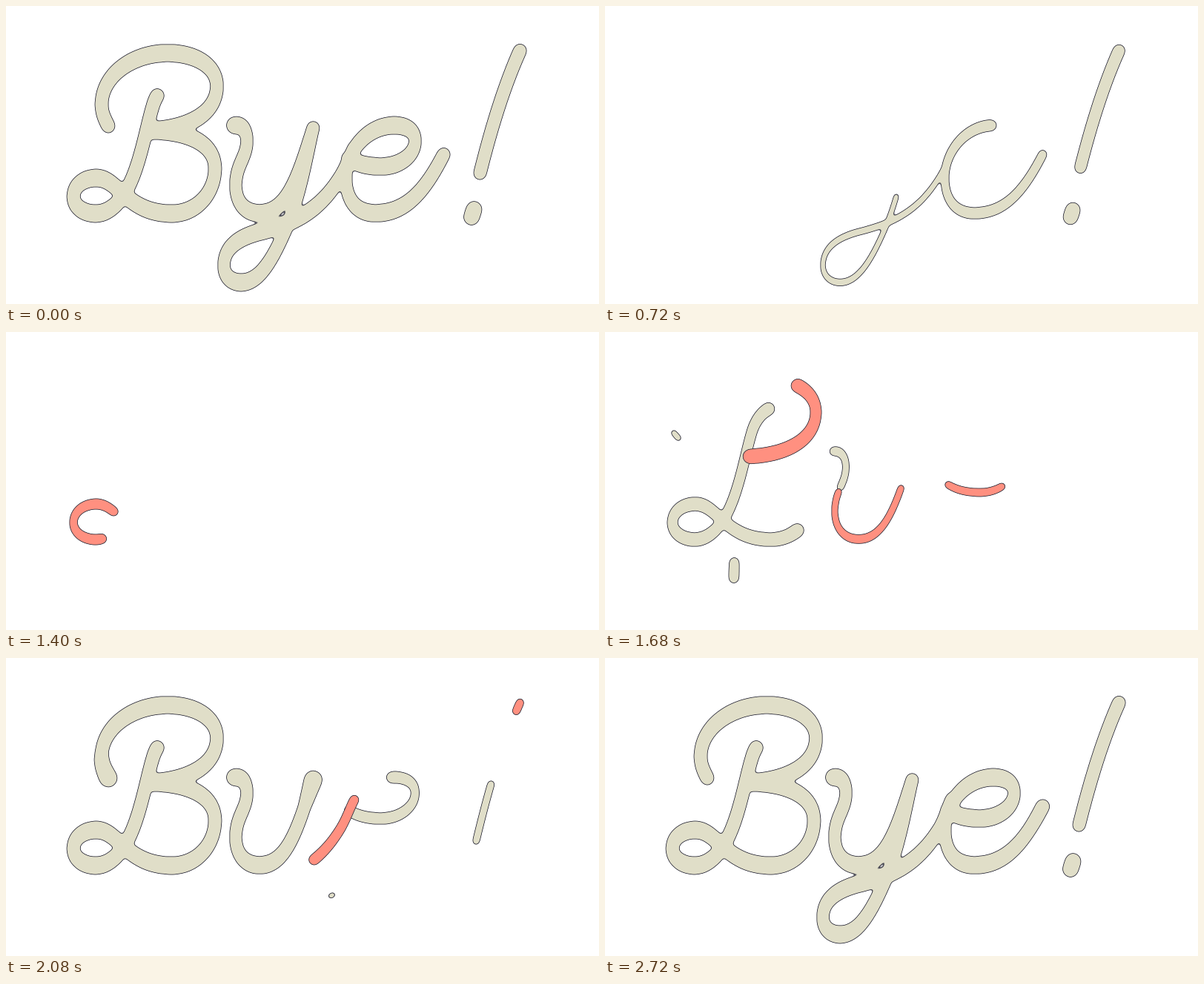
An HTML page with a canvas that plays this animation: 800 px wide and 402 px high, repeating every 3160 ms.

```html
<!DOCTYPE html>
<html lang="en">
<head>
<meta charset="utf-8">
<title>Bye!</title>
<style>
html, body { margin: 0; width: 100%; height: 100%; overflow: hidden; background: #fff; }
canvas { display: block; }
</style>
</head>
<body>
<canvas id="stage" width="800" height="402"></canvas>
<script>
const W = 800, H = 402, LOOP = 3160, STEP = 40, BLANK = 1160;
const CREAM = [224, 222, 200], SALMON = [255, 144, 128], INK = [42, 42, 56];
const BLUR = 2.2, EDGE = 0.48;

const ctx = document.getElementById('stage').getContext('2d');
const makeContext = () => {
  const c = document.createElement('canvas');
  c.width = W;
  c.height = H;
  return c.getContext('2d', { willReadFrequently: true });
};
const mask = makeContext(), soft = makeContext();
mask.lineCap = 'round';
const out = ctx.createImageData(W, H);

const lerp = (a, b, u) => a + (b - a) * u;
const clamp = v => Math.max(0, Math.min(1, v));
const progress = (t, [from, to]) => clamp((t - from) / (to - from));

// Samples a path every pixel; like a flat nib, level strokes are thicker than upright ones.
function trace(d, thin, thick) {
  const path = document.createElementNS('http://www.w3.org/2000/svg', 'path');
  path.setAttribute('d', d);
  const n = Math.ceil(path.getTotalLength());
  const at = i => path.getPointAtLength(i / n * path.getTotalLength());
  return Array.from({ length: n + 1 }, (_, i) => {
    const { x, y } = at(i), p = at(Math.max(0, i - 2)), q = at(Math.min(n, i + 2));
    const dx = q.x - p.x, dy = q.y - p.y;
    return { x, y, w: lerp(thin, thick, dx * dx / (dx * dx + dy * dy || 1)) };
  });
}

// leave, lead and enter are time spans; rest is where the trimmed start settles.
const strokes = [
  { // B
    points: trace('M226 101C212 107 204 118 199 132C190 160 182 210 166 242C154 266 138 280 121 280' +
      'C104 280 91 270 91 257C91 243 104 232 122 232C152 232 162 280 224 280C257 280 282 252 282 219' +
      'C282 188 250 168 192 168C250 166 284.5 142 284.5 108C284.5 81 256 63.5 218 63.5' +
      'C170 63.5 129 94 129 133C129 145 134 154 138 162', 17, 23),
    rest: 0.03, leave: [60, 660], pace: 0.7, lead: [1200, 1800], enter: [1440, 1960]
  },
  { // y, bowl
    points: trace('M309 161C318 160 325 168 325 182C325 204 310 214 310 242C310 266 324 279.5 342 279.5' +
      'C380 279.5 395 225 414.5 164', 16, 23),
    rest: 0, leave: [280, 680], pace: 1.3, lead: [1580, 1700], enter: [1600, 2000]
  },
  { // y, tail
    points: trace('M414.5 164C404 210 396 262 373 311C357 346 340 373 317 373C304 373 294 364 294 350' +
      'C294 327 312 312 345 304C396 291 426 272 452 229C460 215 464 202 470 191', 16, 23),
    rest: 0, leave: [280, 900], pace: 5, lead: [1760, 2020], enter: [2120, 2500]
  },
  { // e
    points: trace('M463 206C476 214 491 216.5 506 216.5C532 216.5 552 200 552 182C552 169 541 161 524 161' +
      'C488 161 458.5 195 458.5 232C458.5 260 472 279.5 498 279.5C538 279.5 564 252 590.5 200', 16, 23),
    rest: 0, leave: [520, 1020], pace: 1.2, lead: [1640, 1880], enter: [1920, 2400]
  },
  { // exclamation mark
    points: trace('M633 252C642 215 662 130 693.5 60', 16.5, 23),
    rest: 0.135, leave: [680, 1100], pace: 1.3, lead: [1880, 1970], enter: [2000, 2190]
  },
  { // its dot
    points: trace('M631.5 274L628 285', 21, 21),
    rest: 0, leave: [700, 1000], pace: 1, lead: [2160, 2200], enter: [2200, 2280]
  }
];

const spark = (from, d, width) => ({ span: [from, from + 200], points: trace(d, width, width) });
const sparks = [
  spark(1600, 'M101 145.5l-12.5 -14.6', 7),
  spark(1600, 'M174.5 303l-1 46', 13),
  spark(1920, 'M430 325l12 -6', 6),
  spark(2120, 'M702 55l12 -7', 6)
];

// Inks the part of a stroke between two fractions; bulge swells the moving end.
function ink(points, a, b, factor, bulge = 0) {
  if (b <= a || factor < 0.05) return;
  const last = points.length - 1, first = Math.round(a * last), end = Math.round(b * last);
  for (let i = first; i < end; i++) {
    const p = points[i], q = points[i + 1];
    const swell = bulge * clamp(1 - (end - i) / 40);
    mask.lineWidth = factor * lerp(p.w, 24, swell);
    mask.beginPath();
    mask.moveTo(p.x, p.y);
    mask.lineTo(q.x, q.y);
    mask.stroke();
  }
}

function drawBody({ points, rest, leave, pace, enter }, t) {
  if (t < BLANK) {
    const u = progress(t, leave);
    ink(points, lerp(rest, 1, u ** pace), 1, 1 - 0.88 * u);
    return;
  }
  const u = progress(t, enter), age = t - enter[0];
  const bulge = clamp((age - 80) / 200) * clamp(1.5 - (t - enter[1]) / 240);
  ink(points, rest * u * u, u, Math.min(1, 0.4 + age / 630), bulge);
}

function drawLead({ points, lead: [from, to] }, t) {
  const head = progress(t, [from, to]), tail = progress(t, [from + 60, to + 120]);
  ink(points, tail, head, Math.min(1, 0.4 + (t - from) / 1100));
}

function drawSpark({ points, span }, t) {
  const u = progress(t, span);
  ink(points, u * u, 1 - (1 - u) ** 2, 1);
}

// Blur and threshold the mask to round off joints and find a thin outline.
function paintGroup(color, draw) {
  mask.clearRect(0, 0, W, H);
  draw();
  soft.clearRect(0, 0, W, H);
  soft.filter = `blur(${BLUR}px)`;
  soft.drawImage(mask.canvas, 0, 0);
  const alpha = soft.getImageData(0, 0, W, H).data, px = out.data;
  const slope = 1 / (BLUR * Math.sqrt(2 * Math.PI));
  for (let i = 0; i < alpha.length; i += 4) {
    if (!alpha[i + 3]) continue;
    const d = (alpha[i + 3] / 255 - EDGE) / slope;
    const fill = clamp(d + 0.5), line = 0.85 * clamp(1.2 - 1.5 * Math.abs(d));
    for (let c = 0; c < 3; c++) {
      px[i + c] = lerp(lerp(px[i + c], color[c], fill), INK[c], line);
    }
  }
}

function render(t) {
  out.data.fill(255);
  paintGroup(CREAM, () => {
    strokes.forEach(s => drawBody(s, t));
    sparks.forEach(s => drawSpark(s, t));
  });
  paintGroup(SALMON, () => strokes.forEach(s => drawLead(s, t)));
  ctx.putImageData(out, 0, 0);
}

let start, shown = -1;
function frame(now) {
  start ??= now;
  const t = Math.floor((now - start) % LOOP / STEP) * STEP;
  if (t !== shown) render(shown = t);
  requestAnimationFrame(frame);
}
requestAnimationFrame(frame);
</script>
</body>
</html>
```
